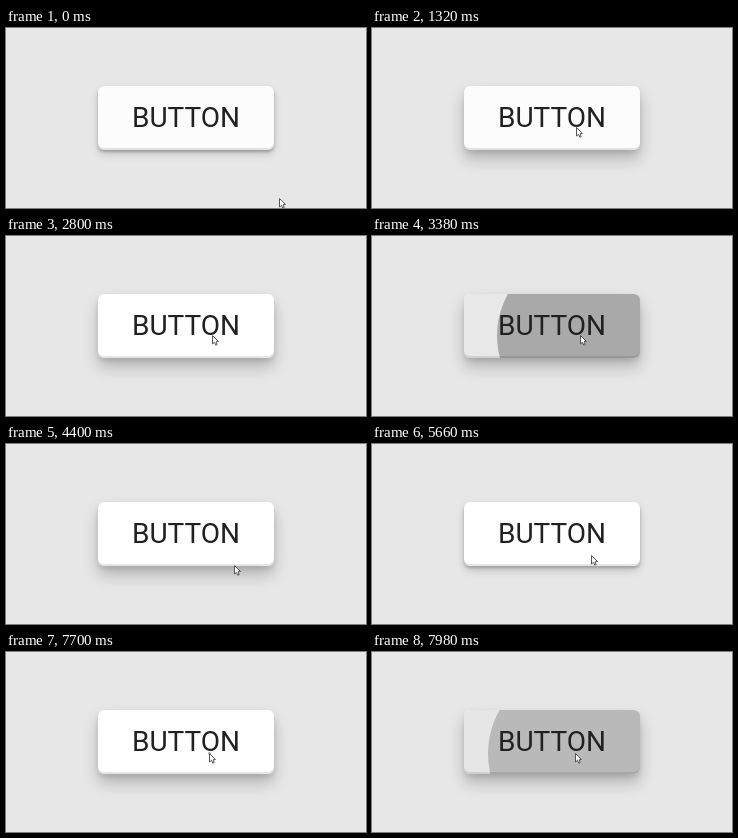
An HTML page that plays this animation: 360x180 px, repeating every 8000 ms.

```html
<!DOCTYPE html>
<html lang="en">
<head>
<meta charset="utf-8">
<title>Button ripple</title>
<style>
  html, body { margin: 0; width: 100%; height: 100%; overflow: hidden; background: #e7e7e7; }
  #stage { position: relative; width: 360px; height: 180px; overflow: hidden; background: #e7e7e7; }
  #button {
    position: absolute; left: 92px; top: 58px; width: 176px; height: 64px; border-radius: 6px;
  }
  #clip { position: absolute; inset: 0; overflow: hidden; border-radius: 6px; }
  #shade, #lip { position: absolute; inset: 0; border-radius: 6px; }
  #shade { background: #000; }
  #lip { box-shadow: inset 0 -2px 0 rgba(0, 0, 0, .1); }
  #wave { position: absolute; border-radius: 50%; background: #000; }
  #label {
    position: absolute; inset: 0; text-align: center; color: #212121;
    font: 28px/64px Roboto, sans-serif;
  }
  #cursor { position: absolute; left: 0; top: 0; width: 9px; height: 13px; overflow: visible; }
</style>
</head>
<body>
<div id="stage">
  <div id="button">
    <div id="clip">
      <div id="lip"></div>
      <div id="shade"></div>
      <div id="wave"></div>
    </div>
    <div id="label">BUTTON</div>
  </div>
  <svg id="cursor" viewBox="0 0 9 13">
    <path d="M.5 .5V9L2.5 7.3L3.8 10.2L5.2 9.6L4 6.8L6.5 6.5Z" fill="#fff" stroke="#444" stroke-width=".9"/>
  </svg>
</div>
<script>
const LOOP = 8000;
const el = id => document.getElementById(id);
const button = el('button'), shade = el('shade'), wave = el('wave'), cursor = el('cursor');

const clamp = x => Math.min(1, Math.max(0, x));
const mix = (a, b, p) => a + (b - a) * p;
const span = (t, a, b) => clamp((t - a) / (b - a));
const smooth = p => p * p * (3 - 2 * p);
const easeIn = p => p ** 1.85;
const easeOut = p => 1 - (1 - p) ** 2.1;

// Pointer moves: start, end, target x, target y, easing
const home = [273, 170];
const moves = [
  [60, 740, 204, 99, easeOut],
  [1300, 1400, 205, 99, easeOut],
  [2780, 2880, 208, 99, easeOut],
  [3960, 4780, 270, 169, easeIn],
  [4780, 4940, 281, 172, easeOut],
  [5180, 5960, 209, 102, easeOut],
  [6040, 6200, 203, 101, easeOut]
];

// Presses: start, end of the fade
const presses = [[1580, 1960], [3180, 3580], [6420, 6840], [7700, 8120]];
const FADE = 190;

function pointer(t) {
  let [x, y] = home;
  for (const [a, b, tx, ty, ease] of moves) {
    if (t < a) break;
    const p = ease(span(t, a, b));
    x = mix(x, tx, p);
    y = mix(y, ty, p);
  }
  return [x, y];
}

function hover(t) {
  const ramp = a => smooth(span(t, a, a + 300));
  return ramp(420) - ramp(4420) + ramp(5600);
}

function drawShadow(h) {
  button.style.boxShadow =
    `0 ${mix(2, 3, h)}px ${mix(3, 5, h)}px rgba(0,0,0,${mix(.24, .1, h)}),` +
    `0 ${mix(4, 9, h)}px ${mix(8, 16, h)}px rgba(0,0,0,${mix(.15, .22, h)})`;
}

function drawRipple(t) {
  const press = presses.find(([a, b]) => t >= a && t < b);
  wave.style.display = press ? 'block' : 'none';
  if (!press) {
    shade.style.opacity = 0;
    return;
  }
  const [start, end] = press;
  const [x, y] = pointer(start);
  const age = (t - start) / 1000;
  const r = 90 * (1 - Math.exp(-13 * age));
  const alpha = .27 * (1 - span(t, end - FADE, end));
  wave.style.left = x + .5 - 92 - r + 'px';
  wave.style.top = y + .5 - 58 - r + 'px';
  wave.style.width = wave.style.height = 2 * r + 'px';
  wave.style.opacity = alpha;
  shade.style.opacity = Math.min(alpha, .1 * (1 - Math.exp(-12 * age)));
}

function draw(now) {
  const t = now % LOOP;
  const [x, y] = pointer(t);
  cursor.style.transform = `translate(${Math.round(x)}px, ${Math.round(y)}px)`;
  button.style.background = t < presses[0][0] ? '#fcfcfc' : '#fff';
  drawShadow(hover(t));
  drawRipple(t);
}

const begin = performance.now();
function tick() {
  draw(performance.now() - begin);
  requestAnimationFrame(tick);
}
tick();
</script>
</body>
</html>
```
